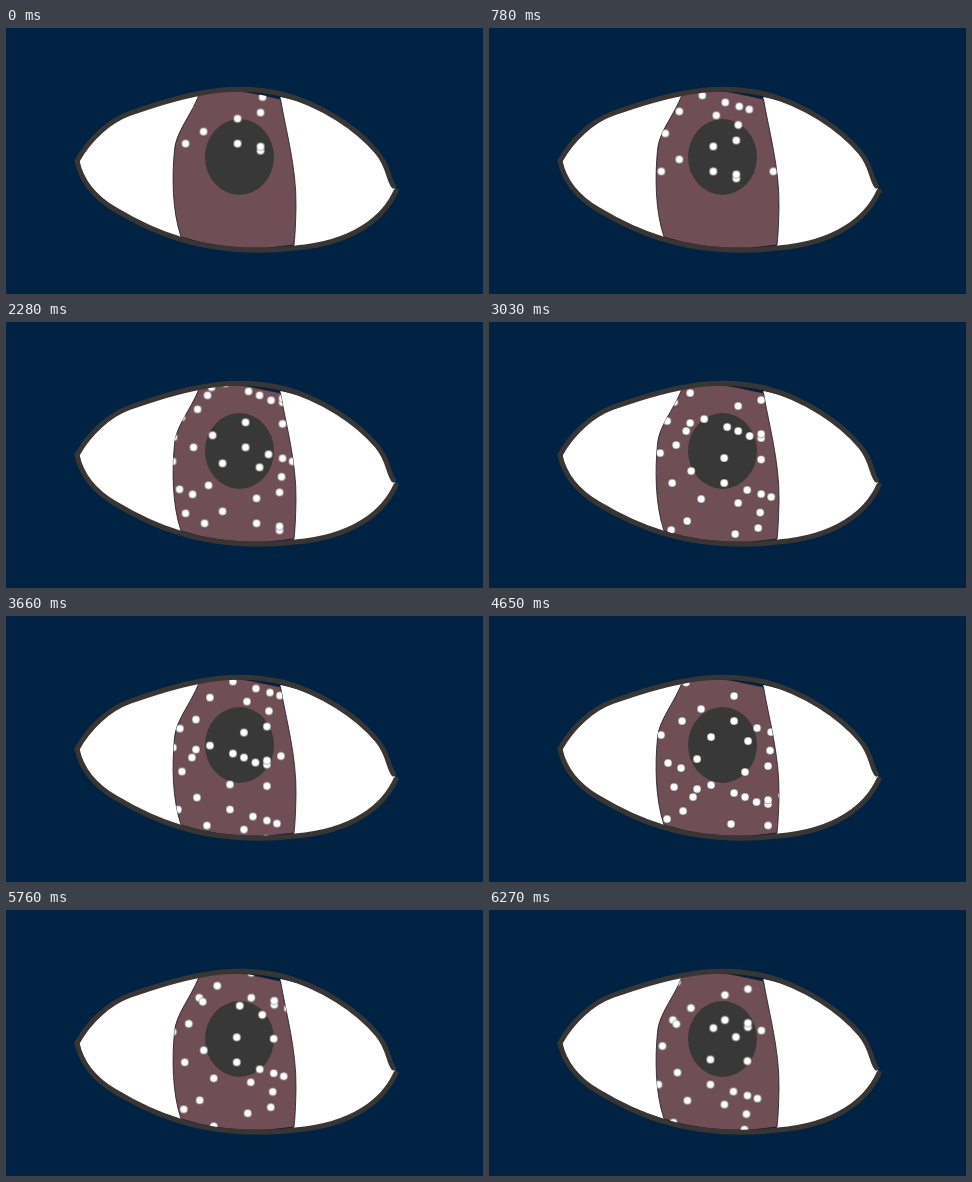
An HTML page without scripts that plays this animation: 477 px wide and 266 px high, repeating every 6300 ms.

```html
<!DOCTYPE html>
<html lang="en">
<head>
<meta charset="utf-8">
<title>Snow in the eye</title>
<style>
  html, body { margin: 0; width: 100%; height: 100%; overflow: hidden; background: #002343; }
  svg { display: block; width: 100vw; height: 100vh; }
  .lid { fill: none; stroke: #383634; stroke-width: 5; stroke-linecap: round; stroke-linejoin: round; }
  circle { r: 4px; fill: #fff; stroke: #3a3033; stroke-width: .4px; }
  .fall { animation: fall 6.3s linear infinite; }
  .sway { animation: sway 6.3s cubic-bezier(.37, 0, .63, 1) infinite; }
  @keyframes fall {
    0% { transform: translateY(0); }
    31.43% { transform: translateY(72px); }
    48.1% { transform: translateY(122px); }
    58.1% { transform: translateY(154.5px); }
    73.81% { transform: translateY(194px); }
    83.33% { transform: translateY(219px); }
    100% { transform: translateY(264.8px); }
  }
  @keyframes sway {
    0% { transform: translateX(0); animation-timing-function: ease-out; }
    7.94% { transform: translateX(-9px); }
    40.48% { transform: translateX(19.7px); }
    60.32% { transform: translateX(2.4px); }
    78.57% { transform: translateX(24.5px); }
    100% { transform: translateX(-2.6px); }
  }
</style>
</head>
<body>
<svg viewBox="0 0 477 266" preserveAspectRatio="none">
  <defs>
    <path id="iris" d="M193 67C212 62 232 62 246 65L274.500 71C280 103 290.500 140 290 178Q289.500 205 288 217L262 220Q215 222 175 209C166 182 166 148 168.500 122C170 104 184 89 193 67Z"/>
    <clipPath id="inside"><use href="#iris"/></clipPath>
    <g id="cluster">
      <circle cx="221" cy="14"/><circle cx="258" cy="15.500"/><circle cx="188" cy="27"/>
      <circle cx="149" cy="29"/><circle cx="169" cy="39"/><circle cx="221" cy="39"/>
      <circle cx="244" cy="46"/><circle cx="258" cy="50"/><circle cx="268" cy="53"/>
      <circle cx="148" cy="53"/><circle cx="198" cy="55"/><circle cx="235" cy="59"/>
      <circle cx="257" cy="68.500"/><circle cx="184" cy="77"/><circle cx="155" cy="81"/>
      <circle cx="255" cy="84"/><circle cx="168" cy="86"/><circle cx="232" cy="90"/>
      <circle cx="198" cy="103"/><circle cx="161" cy="105"/><circle cx="180" cy="115"/>
      <circle cx="232" cy="115"/><circle cx="292" cy="115"/><circle cx="255" cy="122"/>
      <circle cx="255" cy="118"/>
    </g>
    <g id="strand">
      <circle cx="187" cy="-21"/><circle cx="224" cy="-17"/><circle cx="272" cy="-14.500"/>
      <circle cx="246.500" cy="-8"/><circle cx="173" cy="1"/><circle cx="157" cy="9"/>
    </g>
  </defs>

  <rect width="477" height="266" fill="#002343"/>

  <!-- white of the eye, left and right of the iris -->
  <path fill="#fff" d="M71 133C83 111 103 93 123.500 85.500C146 77.500 172 69.500 193 66L200 140L175 211C152 204 129 193.500 109 181.500C87 168.500 75 152 71 133Z"/>
  <path fill="#fff" d="M274.500 69C316 77 352 101 371 124C383 138 382 151 387.500 158L390.500 163C378 190 347 215.500 288 219L270 140Z"/>

  <use href="#iris" fill="#704e55" stroke="#1c1a20" stroke-width=".8"/>
  <ellipse cx="233.500" cy="129" rx="34.500" ry="38" fill="#383838"/>

  <g clip-path="url(#inside)">
    <g class="fall"><g class="sway">
      <use href="#cluster"/>
      <use href="#cluster" x="3" y="-128"/>
      <use href="#cluster" x="6.500" y="-268.500"/>
      <use href="#strand"/>
      <use href="#strand" x="3" y="-128.500"/>
    </g></g>
  </g>

  <path class="lid" d="M71 133C83 111 103 93 123.500 85.500C146 77.500 172 69.500 193 65.500C220 60 250 60 276 66C316 76.500 352 101 371 124C383 138 382 151 387.500 158"/>
  <path class="lid" d="M71 133C75 152 87 168.500 109 181.500C129 193.500 152 204.500 173.500 211C205 221.500 250 225 289 220C347 215.500 378 190 390 163"/>
</svg>
</body>
</html>
```
